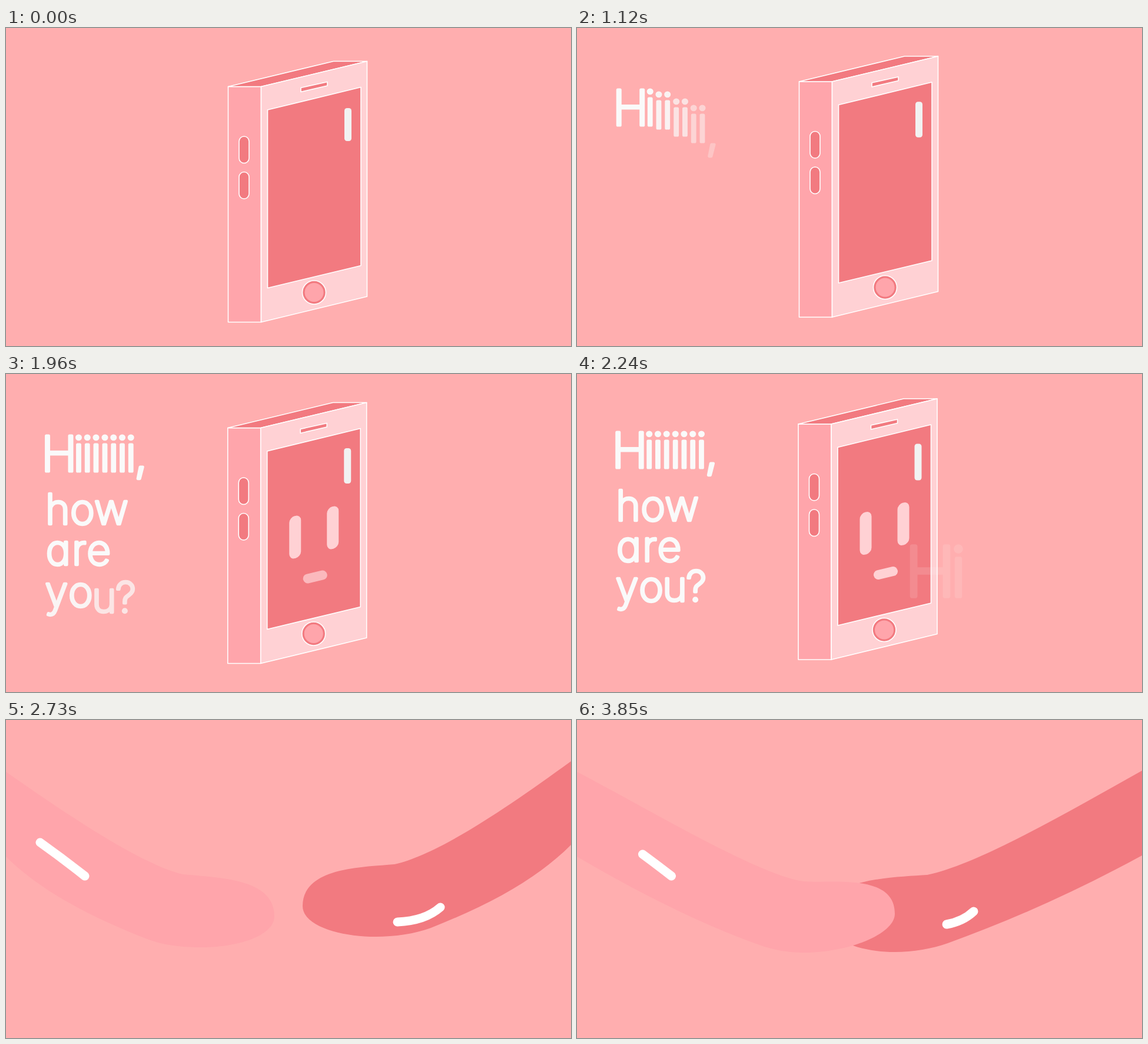
These frames come from a looping animation (960x540 px, 3920 ms). An HTML page:

```html
<!DOCTYPE html>
<html lang="en">
<head>
<meta charset="utf-8">
<title>Hello phone</title>
<style>
  html, body { margin: 0; width: 100%; height: 100%; overflow: hidden; background: #ffaeaf; }
  svg { display: block; width: 100vw; height: 100vh; }
  .line { stroke: #fff; stroke-width: 1.6; stroke-linejoin: round; }
  .dark { fill: #f27a80; }
  .mid { fill: #ffa5ab; }
  .pale { fill: #ffd1d4; }
  .glint { fill: none; stroke: #fff; stroke-width: 15; stroke-linecap: round; }
  #sparks path { fill: none; stroke: #fff; stroke-width: 2.2; stroke-linecap: round; stroke-dasharray: 58 300; }
  text {
    font-family: Inter, sans-serif; font-weight: 200; font-feature-settings: "cv11";
    text-anchor: middle; fill: #fafafa; stroke: #fafafa; stroke-linejoin: round;
  }
</style>
</head>
<body>
<svg viewBox="0 0 960 540">
  <g id="scene">
    <g class="line">
      <path class="mid" d="M377.5 99.5H433.5V499.5H377.5Z"/>
      <path class="dark" d="M377.5 99.5L556.5 56.5H613.5L433.5 99.5Z"/>
      <path class="pale" d="M433.5 99.5L613.5 56.5V456L433.5 499.5Z"/>
      <path class="dark" d="M444.5 139L603 100.5V403.5L444.5 441.5Z"/>
      <path class="dark" d="M501 101.5L546 91.5V98L501 108.5Z"/>
      <rect class="dark" x="396" y="184" width="17" height="45.5" rx="8.5"/>
      <rect class="dark" x="396" y="244.5" width="17" height="45.5" rx="8.5"/>
      <circle class="dark" cx="523.5" cy="449" r="20"/>
    </g>
    <circle class="mid" cx="523.5" cy="449" r="16"/>
    <rect id="glare" x="575" width="12" rx="4.5" fill="#f2f2f2"/>
    <g id="eyes" class="pale">
      <rect x="-10" y="-36" width="20" height="72" rx="9.5"/>
      <rect x="-10" y="-36" width="20" height="72" rx="9.5"/>
    </g>
    <path id="mouth" d="M513.5 355.5L538.5 349.5" stroke="#ffd1d4" stroke-width="16" stroke-linecap="round"/>
    <g id="sparks" transform="translate(0 1.5)">
      <path pathLength="100" d="M657 214C665 200 676 193 686 178"/>
      <path pathLength="100" d="M647 366C658 375 674 380 686 389"/>
      <path pathLength="100" d="M368 264C356 260 341 244 325 235"/>
      <path pathLength="100" d="M397 412C389 424 382 444 368 460"/>
    </g>
    <g id="words"></g>
  </g>
  <g id="hands">
    <path id="armR" class="dark"/>
    <path id="armL" class="mid"/>
    <path id="glintL" class="glint"/>
    <path id="glintR" class="glint"/>
  </g>
</svg>
<script>
const LOOP = 3920, STEP = 70, CUT = 2730;
const $ = id => document.getElementById(id);
const clamp = v => Math.max(0, Math.min(1, v));
const ease = v => (v = clamp(v), v * v * (3 - 2 * v));
const mix = (a, b, k) => a + (b - a) * k;
const span = (t, from, length) => clamp((t - from) / length);
const nums = s => s.split(/[ ,]+/).map(Number);

// Eased value through [time, value] points
function track(points, t) {
  const i = points.findIndex(p => p[0] > t);
  if (i < 0) return points[points.length - 1][1];
  if (i === 0) return points[0][1];
  const [t0, a] = points[i - 1], [t1, b] = points[i];
  return mix(a, b, ease((t - t0) / (t1 - t0)));
}
const floatY = [[0, 0], [350, -14.5], [560, -11.5], [840, -14.5], [1120, -8.5], [1680, -1.5], [2240, -14.5], [2700, -15]];
const floatX = [[1680, 0], [2240, -1.5]];

// Letters rise and fade in, two at a time
const letters = [];
function write(string, centers, baseline, size, start, first = 0) {
  [...string].forEach((char, i) => {
    const el = document.createElementNS("http://www.w3.org/2000/svg", "text");
    el.textContent = char;
    el.setAttribute("x", centers[i]);
    el.setAttribute("font-size", size);
    el.setAttribute("stroke-width", size * 0.064);
    $("words").append(el);
    letters.push({ el, baseline, rise: size * 0.7, start: start + 40 * Math.floor((first + i) / 2) });
  });
}
const row = Array.from({ length: 7 }, (_, i) => 124.2 + 14.8 * i);
write("Hiiiiiii,", [91, ...row, 230], 173, 82, 900);
write("how", [88.5, 130.5, 179.5], 263, 71, 1654);
write("are", [89.5, 125, 158.5], 332, 71, 1654, 3);
write("you?", [86.5, 127.5, 167.5, 204], 400, 71, 1654, 6);
write("Hi", [601.5, 649.5], 321, 116, 2214);

// Arm outlines: apart, then clasped
const left = [
  nums("0 88 110 165 230 245 300 262 360 268 456 268 456 333 456 368 390 386 333 386 300 386 268 383 240 372 150 337 60 292 0 232"),
  nums("0 88 130 163 310 280 385 290 430 294 540 275 540 345 540 380 460 411 385 411 360 411 335 407 310 398 210 358 100 296 0 232")
];
const right = [
  nums("960 70 850 150 735 228 660 245 605 250 504 250 504 316 504 350 570 368 628 368 660 368 695 363 722 353 820 314 900 272 960 212"),
  nums("960 86 840 160 680 262 595 280 540 284 420 285 420 350 420 390 480 411 540 411 570 411 605 405 630 396 740 352 850 296 960 230")
];
const glintLeft = [nums("58 208 96 235 134 265"), nums("115 242 139.5 260 164 279")];
const glintRight = [nums("665 343 712 341 738 318"), nums("624 369 652 364 670 347")];

const blend = ([a, b], k) => a.map((v, i) => mix(v, b[i], k));
// Vertical shake fades out toward the shoulder
function arm(shape, k, shake, shoulder) {
  const p = blend(shape, k);
  for (let i = 0; i < p.length; i += 2)
    p[i + 1] += shake * Math.min(1, Math.abs(p[i] - shoulder) / 300);
  return `M${p.slice(0, 2)}C${p.slice(2)}Z`;
}
function glint(shape, k, dx, dy) {
  const p = blend(shape, k).map((v, i) => v + (i % 2 ? dy : dx));
  return `M${p.slice(0, 2)}Q${p.slice(2)}`;
}

function drawScene(t) {
  const y = track(floatY, t);
  $("scene").setAttribute("transform", `translate(${track(floatX, t)} ${y})`);

  const glare = 56 + 6 * Math.min(1, -y / 11.5);
  $("glare").setAttribute("y", 164 - glare / 2);
  $("glare").setAttribute("height", glare);

  const open = ease(span(t, 1150, 250));
  [[492, 285], [556, 269]].forEach(([cx, cy], i) =>
    $("eyes").children[i].setAttribute("transform", `translate(${cx} ${cy}) skewY(-13) scale(1 ${open})`));
  $("mouth").style.opacity = span(t, 1850, 150);

  const shot = span(t, 1570, 300);
  $("sparks").style.visibility = shot > 0 && shot < 1 ? "inherit" : "hidden";
  for (const s of $("sparks").children) s.style.strokeDashoffset = 58 - 158 * shot;

  for (const { el, baseline, rise, start } of letters) {
    const p = span(t, start, 200);
    el.setAttribute("y", baseline + rise * (1 - p));
    el.setAttribute("opacity", p);
  }
}

function drawHands(t) {
  const k = ease(span(t, CUT, 530));
  const wave = t > 3360 ? Math.sin((t - 3360) / 653 * 2 * Math.PI) : 0;
  $("armL").setAttribute("d", arm(left, k, 16 * wave, 0));
  $("armR").setAttribute("d", arm(right, k, 17 * wave, 960));
  $("glintL").setAttribute("d", glint(glintLeft, k, 3.5 * wave, 14 * wave));
  $("glintR").setAttribute("d", glint(glintRight, k, -4 * wave, 22 * wave));
}

function frame() {
  const t = Math.floor(performance.now() % LOOP / STEP) * STEP;
  const clasp = t >= CUT;
  $("scene").style.visibility = clasp ? "hidden" : "visible";
  $("hands").style.visibility = clasp ? "visible" : "hidden";
  (clasp ? drawHands : drawScene)(t);
  requestAnimationFrame(frame);
}
frame();
</script>
</body>
</html>
```
